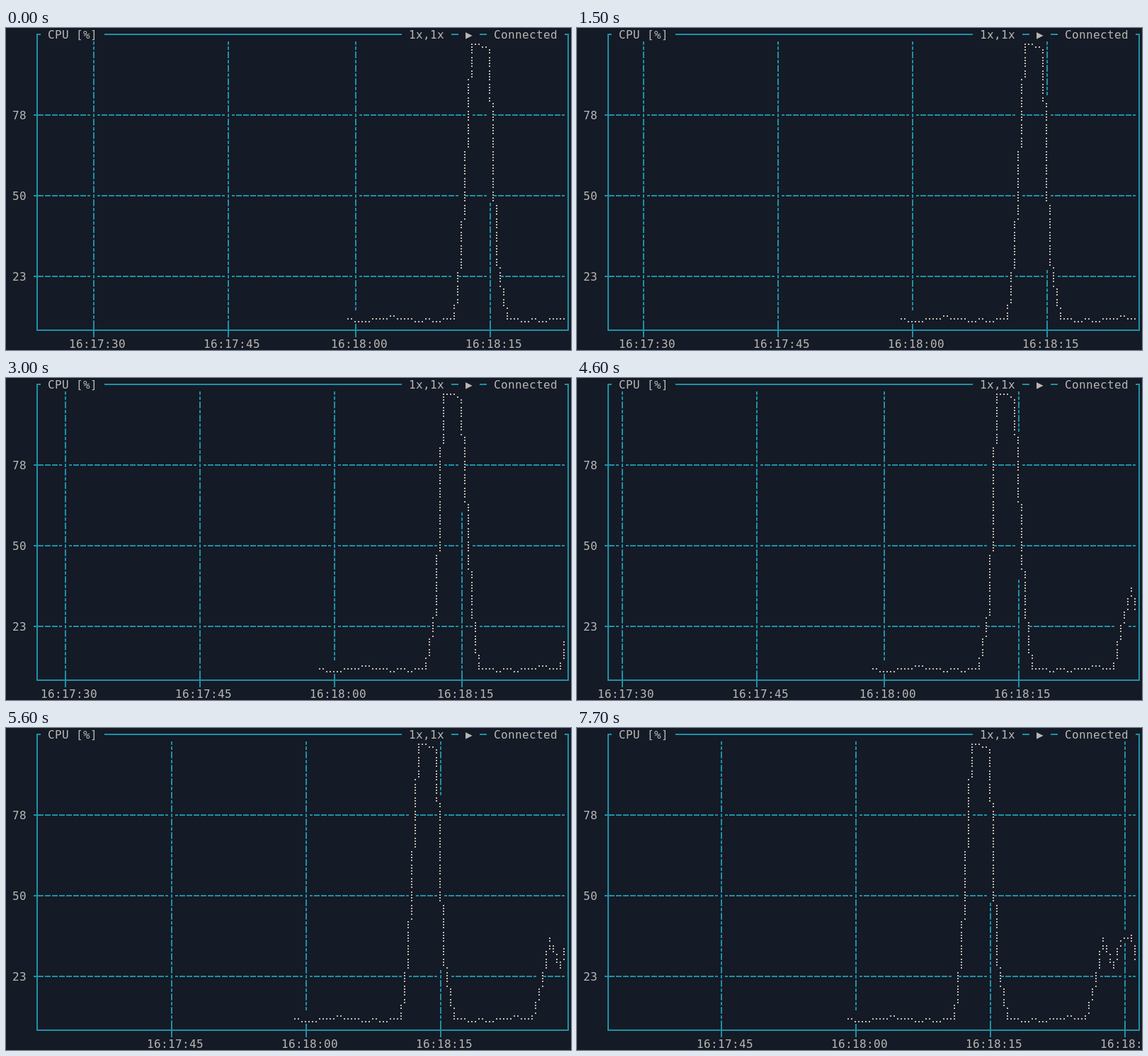
An HTML page with a canvas that plays this animation: 798 by 455 pixels, repeating every 8 s.

```html
<!DOCTYPE html>
<html lang="en">
<head>
<meta charset="utf-8">
<title>CPU chart</title>
<style>
  html, body { margin: 0; width: 100%; height: 100%; overflow: hidden; background: #141a26; }
  canvas { display: block; }
</style>
</head>
<body>
<canvas id="screen" width="798" height="455"></canvas>
<script>
const ctx = document.getElementById('screen').getContext('2d');
const BACK = '#141a26', LINE = '#1f91a5', TEXT = '#b9b7b1', TRACE = '#c6bbb0';
const LOOP = 8000, STEPS = [500, 1500, 3000, 3600, 4600, 5600, 6600, 7700];

// Terminal grid: 10 x 19 pixel cells, the first column cut by one pixel.
const CELL_W = 10, CELL_H = 19;
const LEFT = 4, RIGHT = 79, BOTTOM = 22;
const cellX = col => col * CELL_W - 1;
const cellY = row => row * CELL_H;

// One sample per second, as a height in braille dots from the top of the screen.
const SAMPLES = [86, 87, 87, 86, 86, 85, 86, 86, 87, 86, 87, 86, 86, 67, 4, 4, 6, 67, 86,
  86, 87, 86, 87, 86, 86, 85, 86, 86, 75, 62, 71, 63, 61, 71];
const DOT_X = [3, 8], DOT_Y = [3, 7, 11, 15];
const DOTS_PER_SECOND = 2.5, FIRST_DOT = 96;

const LEVELS = [[6, '78'], [12, '50'], [18, '23']];
const TIMES = ['16:17:30', '16:17:45', '16:18:00', '16:18:15', '16:18:30'];
const TIME_GAP = 18.75;
const FIRST_TIME = [12.4, 11.2, 9.9, 8.65, 7.5, 6.4, 4.9, 3.6, 2.1];

function write(col, row, text) {
  ctx.fillStyle = TEXT;
  ctx.font = '16px "DejaVu Sans Mono", monospace';
  [...text].forEach((char, i) => ctx.fillText(char, cellX(col + i), cellY(row) + 15));
}

function line(x, y, w, h) {
  ctx.fillStyle = LINE;
  ctx.fillRect(x, y, w, h);
}

const rule = (row, from, to) => line(cellX(from), cellY(row) + 8, (to - from) * CELL_W, 2);

// Dashes touch both ends of a cell and are twice as long as the gaps.
function dashH(col, row) {
  for (const x of [0, 6]) line(cellX(col) + x, cellY(row) + 8, 4, 2);
}
function dashV(col, row) {
  const unit = CELL_H / 8;
  for (const i of [0, 3, 6]) line(cellX(col) + 4, cellY(row) + i * unit, 2, 2 * unit);
}

function drawFrame() {
  const x = cellX(LEFT) + 4, right = cellX(RIGHT) + 4;
  const top = 8, bottom = cellY(BOTTOM) + 8;
  line(x, top, 2, bottom - top + 2);
  line(right, top, 2, bottom - top + 2);
  line(x, bottom, right - x + 2, 2);
  line(x, top, 6, 2);
  line(right - 4, top, 6, 2);
  for (const [from, to] of [[14, 56], [63, 64], [67, 68]]) rule(0, from, to);
  write(6, 0, 'CPU [%]');
  write(57, 0, '1x,1x');
  write(65, 0, '▶');
  write(69, 0, 'Connected');
}

// Rounds halves toward zero, so ties stay with the start of a segment.
const roundIn = v => Math.sign(v) * Math.ceil(Math.abs(v) - 0.5);

function traceDots(step) {
  const dots = new Map();
  const dotX = i => Math.floor(FIRST_DOT + DOTS_PER_SECOND * (i - step));
  for (let i = 1; i < SAMPLES.length; i++) {
    const x = dotX(i - 1), y = SAMPLES[i - 1];
    const dx = dotX(i) - x, dy = SAMPLES[i] - y;
    const count = Math.max(dx, Math.abs(dy));
    for (let j = 0; j <= count; j++) {
      const px = x + roundIn(j * dx / count), py = y + roundIn(j * dy / count);
      if (px < 2 * RIGHT) dots.set(px + ',' + py, [px, py]);
    }
  }
  return [...dots.values()];
}

function draw(step) {
  ctx.fillStyle = BACK;
  ctx.fillRect(0, 0, 798, 455);
  drawFrame();

  const dots = traceDots(step);
  const taken = new Set(dots.map(([x, y]) => (x >> 1) + ',' + (y >> 2)));
  const free = (col, row) => !taken.has(col + ',' + row);
  const marks = TIMES
    .map((label, i) => [Math.floor(FIRST_TIME[step] + i * TIME_GAP), label])
    .filter(([col]) => col > LEFT && col < RIGHT);
  const markCols = new Set(marks.map(([col]) => col));

  for (const [row, label] of LEVELS) {
    write(1, row, label);
    rule(row, LEFT, LEFT + 1);
    for (let col = LEFT + 1; col < RIGHT; col++) {
      if (!markCols.has(col) && free(col, row)) dashH(col, row);
    }
  }
  for (const [col, label] of marks) {
    write(col - 3, BOTTOM + 1, label);
    line(cellX(col) + 4, cellY(BOTTOM), 2, CELL_H);
    for (let row = 1; row < BOTTOM; row++) if (free(col, row)) dashV(col, row);
  }

  ctx.fillStyle = TRACE;
  for (const [x, y] of dots) {
    ctx.fillRect(cellX(x >> 1) + DOT_X[x & 1], cellY(y >> 2) + DOT_Y[y & 3], 2, 2);
  }
}

let shown = -1;
function tick() {
  const time = performance.now() % LOOP;
  const step = STEPS.filter(start => start <= time).length;
  if (step !== shown) draw(shown = step);
  requestAnimationFrame(tick);
}
tick();
</script>
</body>
</html>
```
